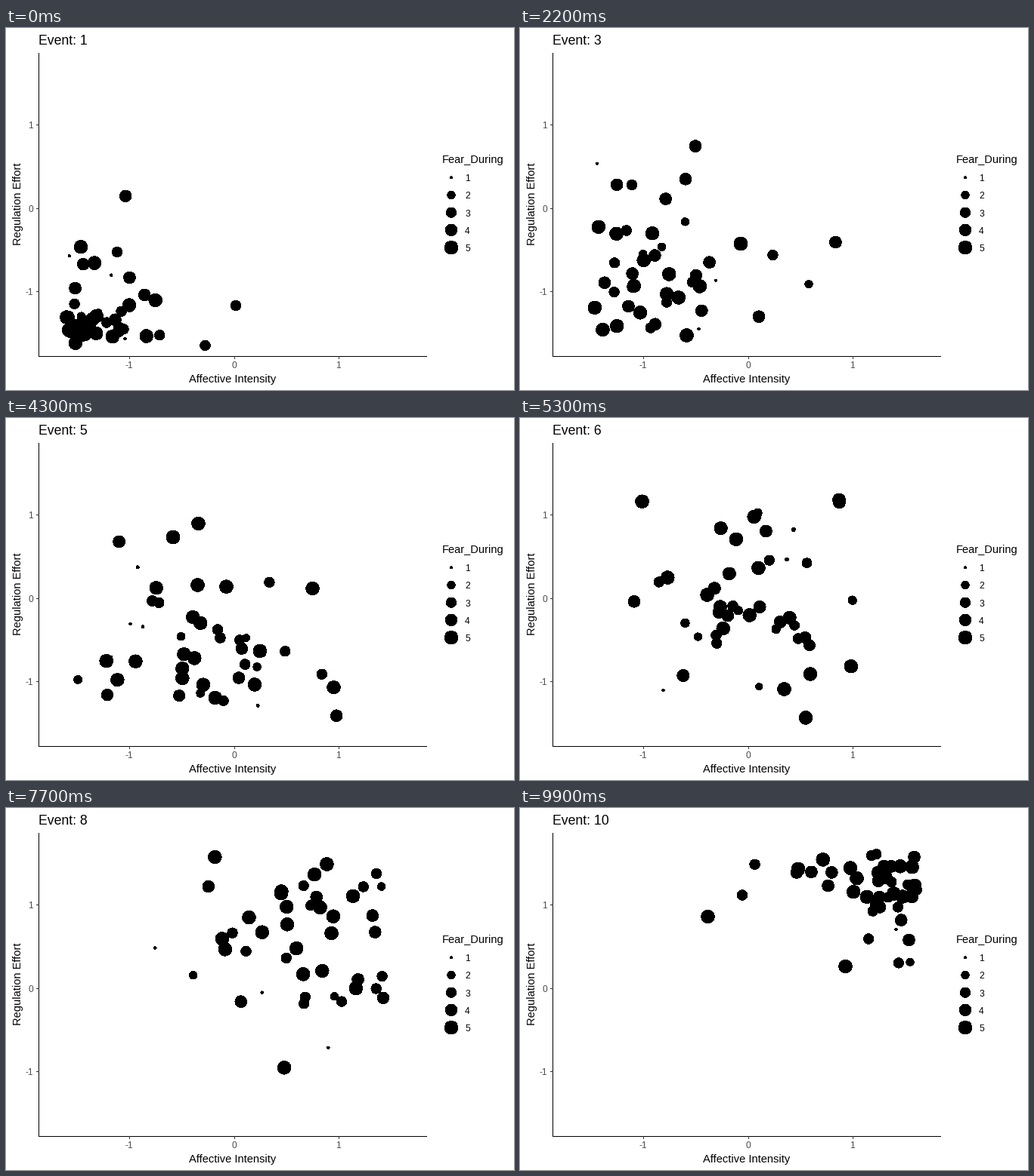
A matplotlib script that plays this animation: 672x480 px, repeating every 10 s.

```python
import numpy as np
import matplotlib.pyplot as plt
from matplotlib.animation import FuncAnimation

W, H, DPI = 672, 480, 96
EVENTS, STEPS, DOTS = 10, 11, 46
FRAMES = (EVENTS - 1) * STEPS + 1
PT = 72 / DPI
LIMIT = 1.7

plt.rcParams["font.family"] = "Liberation Sans"
rng = np.random.default_rng(7)


def dot_size(fear):
    """Dot size in mm, with its area growing with fear."""
    return 1 + 5 * np.sqrt((fear - 1) / 4)


def area(size):
    """Marker area in square points for a dot size in mm."""
    return ((2.845 * size + .4) * PT) ** 2


def to_px(xy):
    return np.array([301.5, 238.7]) + xy * np.array([138.4, -110.5])


def make_poses():
    """Ratings on a bounded scale, drifting from the low to the high corner."""
    habit = rng.normal(size=(DOTS, 2))
    fresh = rng.normal(size=(EVENTS, DOTS, 2))
    drift = np.linspace(-.92, .92, EVENTS)[:, None, None]
    return LIMIT * np.tanh(drift + .5 * (.6 * habit + .8 * fresh))


def make_sizes():
    """Each dot keeps a usual fear level and strays by one step at most."""
    usual = rng.choice([2, 3, 4, 5], DOTS, p=[.15, .25, .2, .4])
    stray = rng.integers(-1, 2, (EVENTS, DOTS))
    return dot_size(np.clip(usual + stray, 1, 5))


POSES, SIZES = make_poses(), make_sizes()

fig = plt.figure(figsize=(W / DPI, H / DPI), dpi=DPI, facecolor="white")
ax = fig.add_axes([0, 0, 1, 1])
ax.set(xlim=(0, W), ylim=(H, 0))
ax.axis("off")


def label(x, y, s, size=9, color="black", **kw):
    return ax.text(x, y, s, fontsize=size, color=color, va="baseline", **kw)


def line(x, y, color="black"):
    ax.plot(x, y, color=color, lw=PT, antialiased=False,
            solid_capstyle="butt", zorder=3)


def dots(xy, size):
    return ax.scatter(xy[:, 0], xy[:, 1], s=area(size), c="black",
                      linewidths=0, antialiased=False, zorder=2)


# Axes
line([43, 43], [33, 435])
line([43, 556], [435, 435])
for v in (-1, 0, 1):
    px, py = to_px(np.array([v, v]))
    line([px, px], [435, 438], "#333333")
    line([40, 43], [py, py], "#333333")
    label(px, 451, str(v), color="#4d4d4d", ha="center")
    label(36, py + 5, str(v), color="#4d4d4d", ha="right")

title = label(43, 22, "", 13.2)
label(300, 470, "Affective Intensity", 11, ha="center")
label(20, 233, "Regulation Effort", 11, ha="center",
      rotation=90, rotation_mode="anchor")

# Legend
levels = np.arange(1, 6)
rows = 198.3 + 23.2 * (levels - 1)
label(577, 179, "Fear_During", 11)
dots(np.column_stack([np.full(5, 589), rows]), dot_size(levels))
for n, y in zip(levels, rows):
    label(607, y + 5, str(n))

cloud = dots(to_px(POSES[0]), SIZES[0])


def update(k):
    i = min(k // STEPS, EVENTS - 2)
    f = k / STEPS - i
    cloud.set_offsets(to_px((1 - f) * POSES[i] + f * POSES[i + 1]))
    cloud.set_sizes(area((1 - f) * SIZES[i] + f * SIZES[i + 1]))
    title.set_text(f"Event: {round(1 + k / STEPS)}")
    return cloud, title


anim = FuncAnimation(fig, update, frames=FRAMES, interval=100,
                     repeat=True, repeat_delay=0, blit=False)
plt.show()
```
